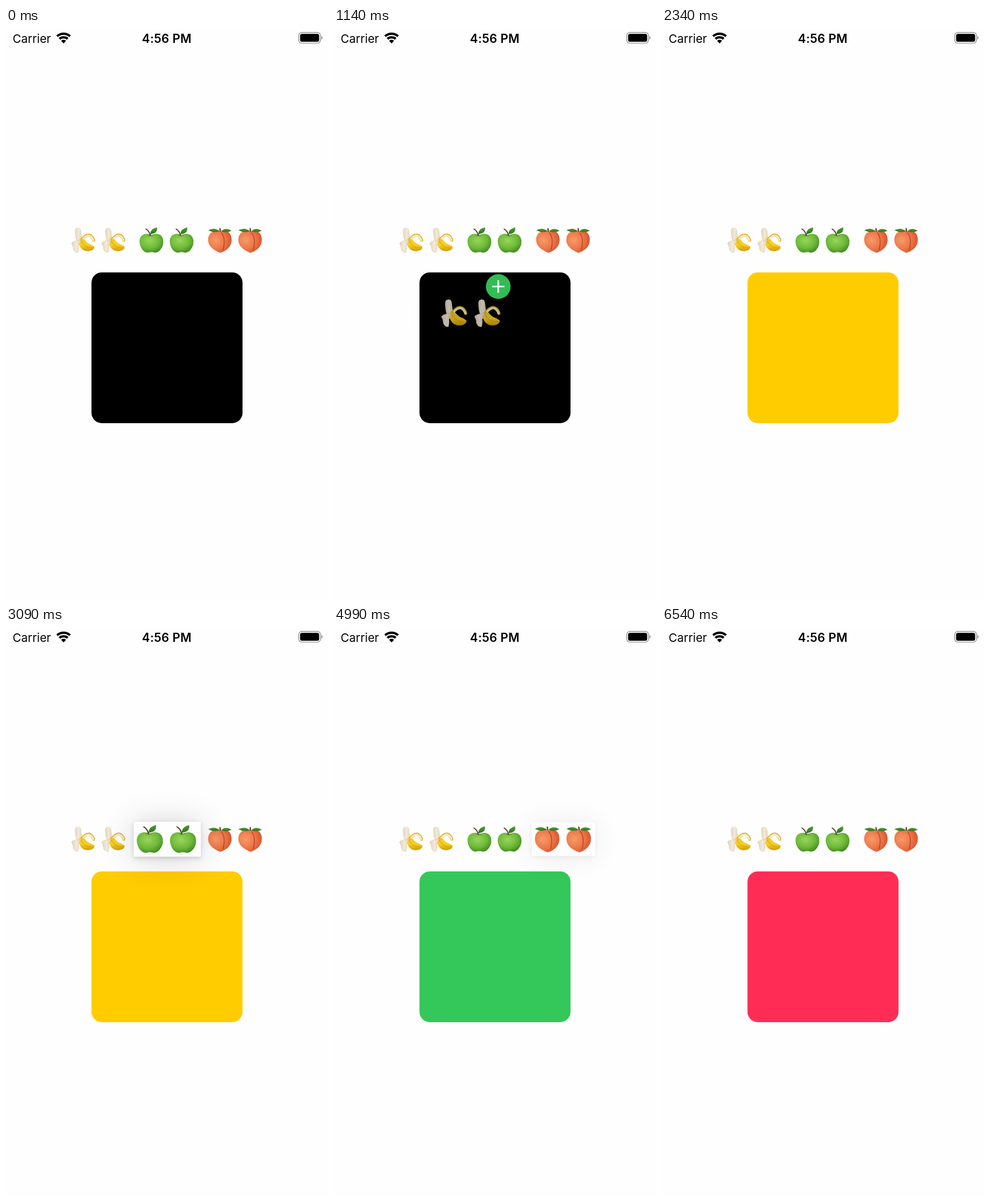
Recreate the animation shown at these times as an HTML page. Size 562 px wide and 997 px high, loop 6.59 s.

```html
<!DOCTYPE html>
<html lang="en">
<head>
<meta charset="utf-8">
<title>Fruit drag and drop</title>
<style>
  html, body { margin: 0; width: 100%; height: 100%; overflow: hidden; background: #fefefe; }
  svg { position: absolute; left: 0; top: 0; overflow: visible; }
  text { font-family: Inter, "Liberation Sans", sans-serif; }
  #preview { position: absolute; left: -53px; top: -28px; width: 106px; height: 56px; }
  #shadow {
    position: absolute; inset: 0;
    box-shadow: 0 2px 7px rgba(0, 0, 0, .14), 0 2px 50px rgba(0, 0, 0, .18);
  }
</style>
</head>
<body>
<svg id="stage" width="562" height="997" viewBox="0 0 562 997">
  <defs>
    <linearGradient id="flesh" x1="0" x2="1">
      <stop offset="0" stop-color="#dfd2bb"/><stop offset=".5" stop-color="#f3eadb"/><stop offset="1" stop-color="#e2d3b4"/>
    </linearGradient>
    <linearGradient id="peel" x1="0" y1="0" x2="0" y2="1">
      <stop offset="0" stop-color="#f4c81f"/><stop offset=".55" stop-color="#f8cf26"/><stop offset="1" stop-color="#cf9a08"/>
    </linearGradient>
    <radialGradient id="green" cx=".42" cy=".36" r=".68">
      <stop offset="0" stop-color="#98d65c"/><stop offset=".6" stop-color="#6fb93a"/><stop offset="1" stop-color="#428a20"/>
    </radialGradient>
    <radialGradient id="orange" cx=".32" cy=".42" r=".72">
      <stop offset="0" stop-color="#f79a68"/><stop offset=".6" stop-color="#ed7446"/><stop offset="1" stop-color="#d2522e"/>
    </radialGradient>
    <linearGradient id="leaf" x1="0" y1="0" x2="0" y2="1">
      <stop offset="0" stop-color="#4f9c34"/><stop offset="1" stop-color="#2e7420"/>
    </linearGradient>

    <g id="banana">
      <path fill="url(#flesh)" d="M-14-17Q-14-22-9-22.500Q-4-23-3.500-17L-2-5Q-4 3-11 2Q-14-5-14-17Z"/>
      <path fill="url(#peel)" d="M-8 3Q-7-5 0-5Q4 2 10 5.500Q17 8 20 11Q20 15 16 17Q8 20.500 1 17Q-6 13-8 3Z"/>
      <path fill="none" stroke="#c9960c" stroke-width=".9" d="M-4 0Q1 10 9 12Q14 13.500 18 12.500"/>
      <g fill="none" stroke-linecap="round">
        <path stroke="#e3b21c" stroke-width="5" d="M-1-3Q7-12 13-8.500Q17-6 18.500-.5"/>
        <path stroke="#f3e9d0" stroke-width="3" d="M0-3Q7-11 12.500-8Q16.500-5.500 18-.5"/>
      </g>
      <path fill="url(#flesh)" stroke="#d5c5a2" stroke-width=".6" d="M-10 0Q-19 2-20 5Q-17 9-17 15Q-15 21-9 21Q-7 15-8 9Q-6 5-4 0Q-7-2-10 0Z"/>
    </g>

    <g id="apple">
      <path fill="url(#green)" d="M0-9Q-6-13-12-11C-20-9-23 0-19 10C-16 18-10 22-5 21Q0 19.500 5 21C11 22 17 17 20 8C22 0 20-9 12-11Q6-13 0-9Z"/>
      <path fill="#39771a" opacity=".4" d="M-8-9.500Q-2-12 5-9.500Q-1-5-8-9.500Z"/>
      <path fill="none" stroke="#5b3524" stroke-width="1.900" stroke-linecap="round" d="M-9.500-20Q-4-17-2-9"/>
      <path fill="url(#leaf)" d="M-2-11Q-2-20 9.500-23Q12-12-2-11Z"/>
    </g>

    <g id="peach">
      <path fill="url(#orange)" d="M1-14.500C-6-19-20-16-20.500-2C-21 10-11 17 1 21.500C12 18 21 10 20.500-2C20-16 9-19 1-14.500Z"/>
      <path fill="none" stroke="#b9482a" stroke-width="1.500" d="M2-14Q8-8 7.500 4Q7 12 5 17"/>
      <path fill="url(#leaf)" d="M0-16Q-9-24-20.500-18Q-11-12.500 0-16Z"/>
      <path fill="url(#leaf)" d="M2-16Q10-24 20.500-17Q11-12.500 2-16Z"/>
      <path fill="none" stroke="#6b4630" stroke-width="2.400" d="M0-21.500L1-15"/>
    </g>
  </defs>

  <text x="11.500" y="25.500" font-size="20.500">Carrier</text>
  <text x="280.500" y="25.500" font-size="21" font-weight="600" letter-spacing=".2" text-anchor="middle">4:56 PM</text>
  <g id="wifi" fill="none" stroke="#000" stroke-width="4"></g>
  <rect x="510.800" y="7.800" width="38.200" height="18.600" rx="5.500" fill="none" stroke="#949494" stroke-width="1.400"/>
  <rect x="513.300" y="10.200" width="33.200" height="13.800" rx="3.200"/>
  <path d="M550.500 14Q552.500 14.500 552.500 17.200T550.500 20.500Z" fill="#949494"/>

  <rect id="box" x="149.200" y="426.700" width="263.600" height="263.200" rx="18"/>
  <g id="sources"></g>
</svg>
<div id="preview">
  <div id="shadow"></div>
  <svg id="carried" width="106" height="56" viewBox="-53 -28 106 56"></svg>
</div>
<svg width="562" height="997" viewBox="0 0 562 997">
  <g id="badge">
    <circle r="22" fill="#34c759"/>
    <path d="M-11 0H11M0-11V11" stroke="#fff" stroke-width="3"/>
  </g>
</svg>
<script>
const LOOP = 6590, ROW = 370.5;
const CENTRE = { x: 281, y: 558 };
const LIFT = 220, DROP = 400;
const drags = [
  { fruit: "banana", x: 162, lift: 140, move: 660, rest: 1360, drop: 1700, to: { x: 250.5, y: 516 }, color: "#ffcc00" },
  { fruit: "apple", x: 281.3, lift: 2790, move: 3130, rest: 3650, drop: 3890, to: { x: 291.3, y: 532.5 }, color: "#34c759" },
  { fruit: "peach", x: 400.8, lift: 4890, move: 5260, rest: 5860, drop: 6150, to: { x: 315, y: 542 }, color: "#ff2d55" }
];

const $ = id => document.getElementById(id);
const phase = (t, a, b) => Math.min(1, Math.max(0, (t - a) / (b - a)));
const mix = (a, b, p) => a + (b - a) * p;
const smooth = p => p * p * (3 - 2 * p);
const cubic = p => p < .5 ? 4 * p ** 3 : 1 - 4 * (1 - p) ** 3;
const pair = fruit => [-27.5, 25.2].map(x => `<use href="#${fruit}" x="${x}" y=".5"/>`).join("");

function drawWifi() {
  const arc = r => {
    const dx = r * .67, y = 27 - r * .742;
    return `M${100.5 - dx} ${y}A${r} ${r} 0 0 1 ${100.5 + dx} ${y}`;
  };
  $("wifi").innerHTML = `<path d="${arc(17)}${arc(10.7)}"/>` +
    `<path d="${arc(6.5)}L100.5 27Z" fill="#000" stroke="none"/>`;
}

drawWifi();
$("sources").innerHTML = drags.map(d =>
  `<g id="${d.fruit}Pair" transform="translate(${d.x} ${ROW})">${pair(d.fruit)}</g>`).join("");

let carriedFruit = "";

function render(t) {
  const dropped = drags.filter(d => t >= d.drop).pop();
  $("box").setAttribute("fill", dropped ? dropped.color : "#000");

  const drag = drags.find(d => t >= d.lift && t < d.drop + DROP);
  for (const d of drags) {
    const hidden = d === drag && cubic(phase(t, d.move, d.rest)) < .02;
    $(d.fruit + "Pair").style.visibility = hidden ? "hidden" : "visible";
  }
  $("preview").style.display = drag ? "block" : "none";
  $("badge").style.display = drag && t < drag.drop ? "inline" : "none";
  if (!drag) return;

  if (carriedFruit !== drag.fruit) {
    carriedFruit = drag.fruit;
    $("carried").innerHTML = pair(carriedFruit);
  }

  const lift = smooth(phase(t, drag.lift, drag.lift + LIFT));
  const travel = phase(t, drag.move, drag.rest);
  const p = cubic(travel);
  const fall = smooth(phase(t, drag.drop, drag.drop + DROP));
  const x = mix(mix(drag.x, drag.to.x, p), CENTRE.x, fall);
  const y = mix(mix(ROW, drag.to.y, p), CENTRE.y, fall);
  const scale = mix(1 + .1 * lift, .25, fall);

  $("preview").style.transform = `translate(${x}px, ${y}px) scale(${scale})`;
  $("preview").style.opacity = mix(1, .8, smooth(phase(travel, .1, .6))) * (1 - fall);
  $("shadow").style.opacity = lift;

  // The badge trails the preview and settles on its top right corner.
  const show = phase(travel, .43, .7);
  const lag = 1 - smooth(phase(travel, .4, .94));
  const bx = x + 57 - 22 * lag, by = y - 30.5 - 36 * lag;
  $("badge").setAttribute("transform", `translate(${bx} ${by}) scale(${mix(.6, 1, show)})`);
  $("badge").setAttribute("opacity", mix(0, 1, show));
}

const start = performance.now();
function tick() {
  render((performance.now() - start) % LOOP);
  requestAnimationFrame(tick);
}
tick();
</script>
</body>
</html>
```
